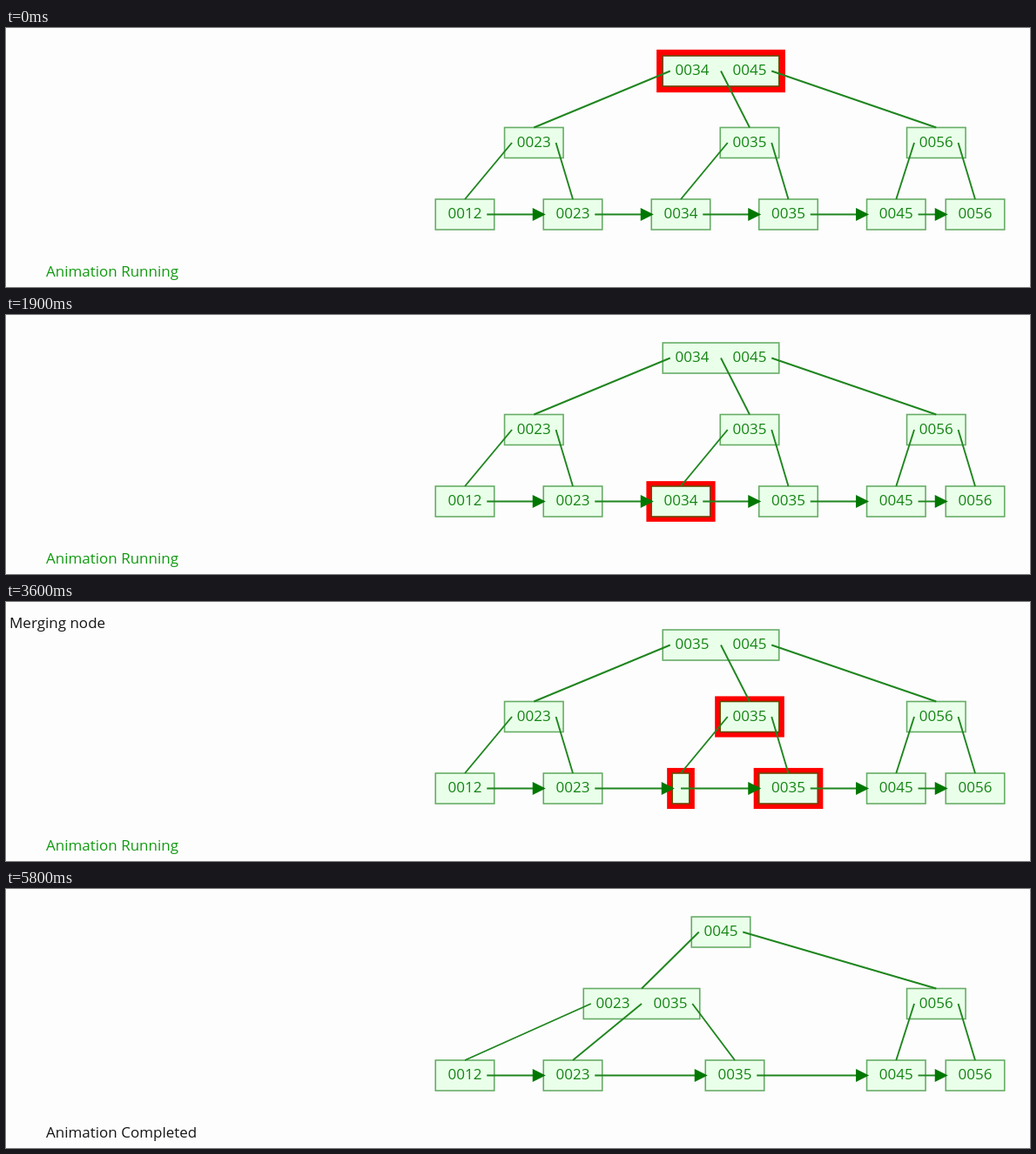
Recreate the animation shown at these times as an HTML page with a canvas. Size 1176 by 298 pixels, loop 5.83 s.

```html
<!DOCTYPE html>
<html lang="en">
<head>
<meta charset="utf-8">
<title>Tree deletion</title>
<style>
html, body { margin: 0; width: 100%; height: 100%; overflow: hidden; background: #fdfdfd; }
canvas { display: block; }
</style>
</head>
<body>
<canvas id="stage" width="1176" height="298"></canvas>
<script>
const ctx = document.getElementById('stage').getContext('2d');
const LOOP = 5830, STEP = 740, FIRST = 1140;
const ROW = [49.5, 132, 214.5];
const HALF_H = 17.5, KEY_W = 66;
const GREEN = '#007700', EDGE = '#1f861f';

// Highlight width swings linearly between two limits.
function pulse(t) {
  const min = 5, max = 11.5, half = 865, lowest = 285;
  const phase = Math.abs(((t - lowest) / half) % 2);
  return min + (max - min) * (phase > 1 ? 2 - phase : phase);
}

function node(x, row, keys, kids = [], lit = false) {
  const half = keys.length ? (KEY_W * keys.length + 1.5) / 2 : 9.75;
  const reach = keys.length ? half - 8.5 : 0;
  return { x, y: ROW[row], keys, kids, lit, half, reach };
}

// Builds the tree for one step of the deletion.
function tree(step) {
  const emptied = step > 2, leafMerged = step > 4, merged = step > 5;
  const merging = step === 4, joining = step === 5;

  const leaves = [node(527, 2, ['0012']), node(651, 2, ['0023'])];
  if (!leafMerged) {
    leaves.push(node(775, 2, emptied ? [] : ['0034'], [], step === 2 || merging));
  }
  leaves.push(node(leafMerged ? 837 : 898.5, 2, ['0035'], [], merging));
  leaves.push(node(1022.3, 2, ['0045']), node(1113, 2, ['0056']));

  const right = node(1068.3, 1, ['0056'], leaves.slice(-2));
  const inner = merged
    ? [node(730, 1, ['0023', '0035'], leaves.slice(0, 3)), right]
    : [
        node(606.3, 1, ['0023'], leaves.slice(0, 2), joining),
        node(854, 1, leafMerged ? [] : ['0035'], leaves.slice(2, -2), step === 1 || merging || joining),
        right
      ];

  const rootKeys = merged ? ['0045'] : [step > 3 ? '0035' : '0034', '0045'];
  const root = node(821, 0, rootKeys, inner, step === 0 || joining);
  return { leaves, nodes: [root, ...inner, ...leaves] };
}

function text(str, x, y, color, align = 'left') {
  ctx.font = '500 17px "Open Sans", "Noto Sans", sans-serif';
  ctx.textAlign = align;
  ctx.fillStyle = color;
  ctx.fillText(str, x, y);
}

function drawNode(n, glow) {
  const box = pad => [n.x - n.half - pad, n.y - HALF_H - pad, 2 * (n.half + pad), 2 * (HALF_H + pad)];
  if (n.lit) {
    ctx.fillStyle = '#ff0000';
    ctx.fillRect(...box(glow));
  }
  ctx.fillStyle = '#eaffea';
  ctx.fillRect(...box(-0.6));
  ctx.strokeStyle = 'rgba(0, 119, 0, 0.6)';
  ctx.lineWidth = 1.6;
  ctx.strokeRect(...box(0));
  n.keys.forEach((key, i) => {
    text(key, n.x + (i - (n.keys.length - 1) / 2) * KEY_W, n.y + 4.5, '#148414', 'center');
  });
}

function line(x1, y1, x2, y2) {
  ctx.strokeStyle = EDGE;
  ctx.lineWidth = 1.9;
  ctx.beginPath();
  ctx.moveTo(x1, y1);
  ctx.lineTo(x2, y2);
  ctx.stroke();
}

function drawEdges(n) {
  const gaps = n.kids.length - 1;
  n.kids.forEach((kid, i) => {
    const shift = gaps ? (2 * i / gaps - 1) * n.reach : 0;
    line(n.x + shift, n.y, kid.x, kid.y - HALF_H);
  });
}

function drawArrow(a, b) {
  const tip = b.x - b.half + 2.5, y = a.y;
  line(a.x + a.reach, y, tip - 8, y);
  ctx.fillStyle = GREEN;
  ctx.beginPath();
  ctx.moveTo(tip, y);
  ctx.lineTo(tip - 15, y - 7.5);
  ctx.lineTo(tip - 15, y + 7.5);
  ctx.fill();
}

function draw(t) {
  const step = Math.max(0, Math.floor((t - FIRST) / STEP) + 1);
  const { leaves, nodes } = tree(step);
  const glow = pulse(t);

  ctx.fillStyle = '#fdfdfd';
  ctx.fillRect(0, 0, 1176, 298);
  for (const lit of [false, true]) {
    nodes.filter(n => n.lit === lit).forEach(n => drawNode(n, glow));
  }
  nodes.forEach(drawEdges);
  leaves.slice(1).forEach((leaf, i) => drawArrow(leaves[i], leaf));

  if (step === 4 || step === 5) text('Merging node', 4, 29.5, '#151515');
  if (step > 6) text('Animation Completed', 46, 285.5, '#151515');
  else text('Animation Running', 46, 285.5, '#109a10');
}

const start = performance.now();
function tick() {
  draw((performance.now() - start) % LOOP);
  requestAnimationFrame(tick);
}
tick();
</script>
</body>
</html>
```
